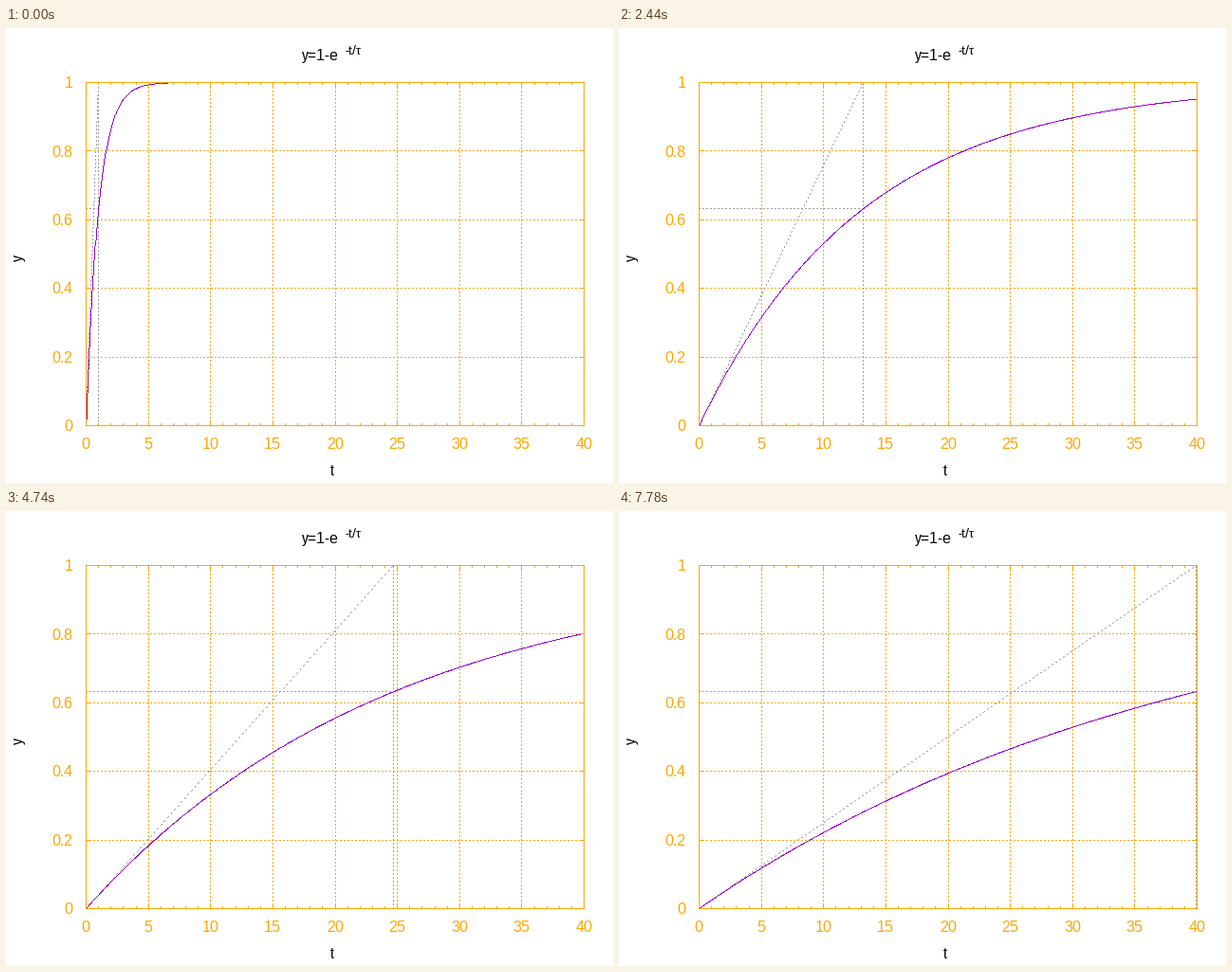
A matplotlib script for the animation above (7.8 s loop, 640 by 480 pixels).

```python
import numpy as np
import matplotlib.pyplot as plt
from matplotlib.animation import FuncAnimation

W, H, DPI = 640, 480, 80
LEFT, RIGHT, TOP, BOTTOM = 84, 609, 57, 419
T_MAX, SAMPLES = 40, 1000
ORANGE, GRAY, VIOLET = "#ffa500", "#a0a0a0", "#9400d3"
FRAMES, STEP_MS = 390, 20

plt.rcParams.update({
    "font.family": "Liberation Sans",
    "text.hinting": "native",
    "text.hinting_factor": 1,
})
fig = plt.figure(figsize=(W / DPI, H / DPI), dpi=DPI, facecolor="white")
ax = fig.add_axes([0, 0, 1, 1])
# Quarter-pixel offsets keep pixel markers clear of rounding ties.
ax.set(xlim=(-0.25, W - 0.25), ylim=(H - 0.75, -0.75))
ax.axis("off")


def px(t):
    return LEFT + (RIGHT - LEFT) * t / T_MAX


def py(y):
    return BOTTOM - (BOTTOM - TOP) * y


def snap(v):
    return np.floor(np.asarray(v) + 0.5)


def path(xs, ys):
    """Pixels of a one-pixel polyline through the rounded points."""
    xs, ys = snap(xs), snap(ys)
    dx, dy = np.diff(xs), np.diff(ys)
    n = np.maximum(abs(dx), abs(dy)).astype(int)
    seg = np.repeat(np.arange(len(n)), n)
    f = (np.arange(len(seg)) - (np.cumsum(n) - n)[seg] + 1) / n[seg]
    return np.array([
        np.append(xs[0], snap(xs[seg] + dx[seg] * f)),
        np.append(ys[0], snap(ys[seg] + dy[seg] * f)),
    ])


def segment(x0, y0, x1, y1):
    return path([x0, x1], [y0, y1])


def dotted(*ends):
    pts = segment(*ends)
    return pts[:, np.arange(pts.shape[1]) % 4 < 2]


def pixels(color, z, parts=None):
    data = np.hstack(parts) if parts else ([], [])
    return ax.plot(*data, ",", color=color, zorder=z)[0]


def label(x, y, s, color="black", size=16, **kw):
    ax.text(x, y, s, color=color, fontsize=size * 72 / DPI, va="baseline", **kw)


grid, frame = [], [
    segment(LEFT, TOP, RIGHT, TOP), segment(LEFT, BOTTOM, RIGHT, BOTTOM),
    segment(LEFT, TOP, LEFT, BOTTOM), segment(RIGHT, TOP, RIGHT, BOTTOM),
]
for t in range(T_MAX + 1):
    x, size = px(t), 2 if t % 5 else 5
    frame += [segment(x, BOTTOM, x, BOTTOM - size), segment(x, TOP, x, TOP + size)]
    if t % 5 == 0:
        grid.append(dotted(x, BOTTOM, x, TOP))
        label(x, 443, str(t), ORANGE, ha="center")
for k in range(6):
    y = py(k / 5)
    frame += [segment(LEFT, y, LEFT + 5, y), segment(RIGHT - 5, y, RIGHT, y)]
    grid.append(dotted(LEFT, y, RIGHT, y))
    label(70.5, y + 5.5, f"{k / 5:g}", ORANGE, ha="right")

label(312, 33, "y=1-e")
label(357, 27, "-t/", size=12.8)
label(369, 27, "τ", size=12.8)
label(344, 471, "t", ha="center")
label(18, 241.5, "y", ha="center", rotation=90, rotation_mode="anchor")

pixels(ORANGE, 1, grid)
guides = pixels(GRAY, 2)
line = pixels(VIOLET, 3)
pixels(ORANGE, 4, frame)

times = np.linspace(0, T_MAX, SAMPLES)


def update(n):
    tau = 1 + 0.1 * n
    x, y = px(tau), py(1 - np.exp(-1))
    guides.set_data(*np.hstack([
        dotted(x, BOTTOM, x, TOP),
        dotted(LEFT, y, x, y),
        dotted(LEFT, BOTTOM, x, TOP),
    ]))
    line.set_data(*path(px(times), py(1 - np.exp(-times / tau))))
    return guides, line


anim = FuncAnimation(fig, update, frames=FRAMES, interval=STEP_MS, repeat=True,
                     repeat_delay=0, blit=False)
plt.show()
```
